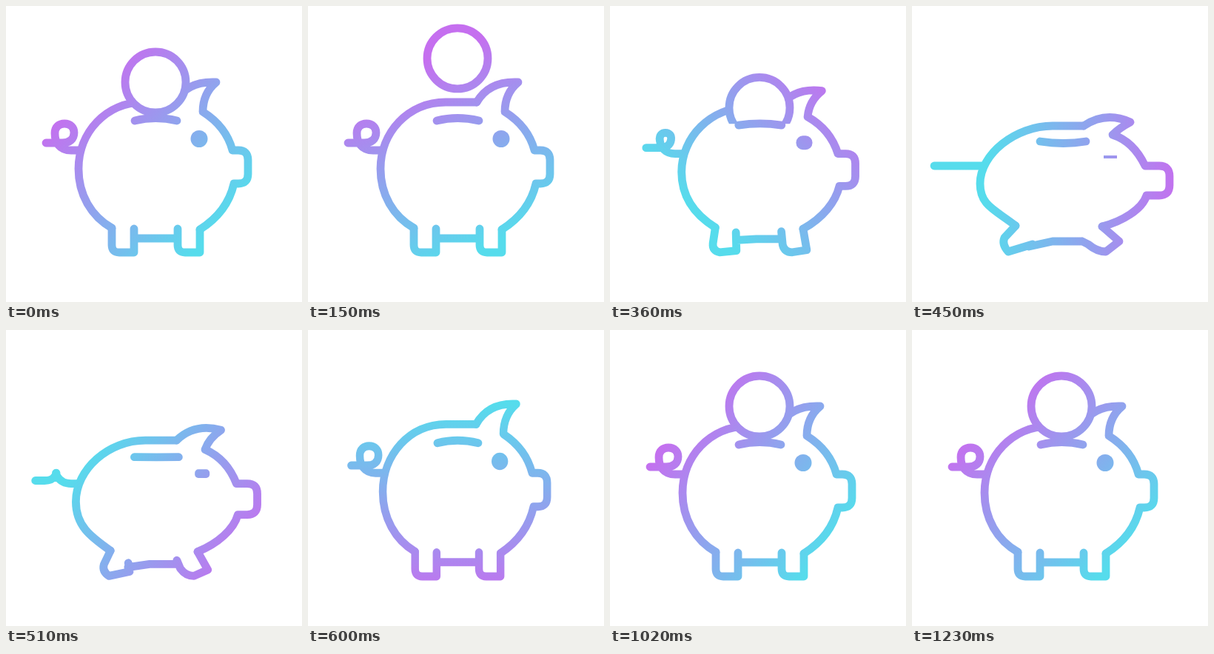
An HTML page with a canvas for the animation above (3260 ms loop, 400x400 px).

```html
<!DOCTYPE html>
<html lang="en">
<head>
<meta charset="utf-8">
<title>Piggy bank</title>
<style>
  html, body { margin: 0; width: 100%; height: 100%; overflow: hidden; background: #fff; }
  canvas { display: block; width: 100vw; height: 100vh; }
</style>
</head>
<body>
<canvas id="stage" width="400" height="400"></canvas>
<script>
const ctx = document.getElementById('stage').getContext('2d');
const LOOP = 3260, END = 1230, STEP = 30;
const CYAN = '#56dcec', PURPLE = '#c56fef';

// Each part has a resting pose and a squashed pose with the same commands.
const parts = [
  { // back and belly
    rest: 'M228 130 L186 130 C135 130 98 171 98 220 C98 255 115 284 143 300',
    flat: 'M232 162 L190 162 C140 162 92 200 92 240 C92 270 112 275 140 297'
  },
  { // legs
    rest: 'M143 300 L143 323 Q143 333 153 333 L173 333 L173 301 M175 314 L200 314 L231 314 ' +
          'M232 301 L232 323 Q232 333 242 333 L262 333 L262 302',
    flat: 'M140 297 L125 313 Q121 322 130 332 L163 322 L160 324 M158 325 L190 318 L230 318 ' +
          'M230 318 L238 322 Q250 332 262 332 L280 318 L257 298'
  },
  { // chest, snout, brow and ear
    rest: 'M262 302 C289 285 303 262 308 240 L314 240 Q327 240 327 227 L327 208 ' +
          'Q327 195 314 195 L306 195 C300 172 285 155 266 143 Q266 118 284 103 Q245 101 228 130',
    flat: 'M257 298 C284 291 311 275 317 256 L334 256 Q348 256 348 242 L348 230 ' +
          'Q348 216 334 216 L315 216 C305 195 290 180 271 174 Q280 165 295 157 Q262 142 232 162'
  },
  { // tail
    rest: 'M101 195 L88 195 C72 195 66 184 66 172 C66 163 72 159 79 159 ' +
          'C87 159 92 164 92 171 C92 180 86 185 76 185 L54 185',
    flat: 'M95 216 L88 216 C82 216 77 216 72 216 C68 216 64 216 60 216 ' +
          'C56 216 52 216 48 216 C44 216 40 216 36 216 L30 216'
  },
  { // slot
    rest: 'M174 155 Q202 148 231 155',
    flat: 'M173 183 Q205 188 235 183'
  }
];

const mix = (a, b, k) => a + (b - a) * k;
const out = p => 1 - (1 - p) ** 2;
const swing = p => 0.5 - 0.5 * Math.cos(Math.PI * p);

function morph({ rest, flat }, k) {
  const goal = flat.match(/\d+/g);
  let i = 0;
  return new Path2D(rest.replace(/\d+/g, n => mix(+n, +goal[i++], k).toFixed(2)));
}

// Eases to a stop at every key.
function keyed(keys, t) {
  for (let i = 1; i < keys.length; i++) {
    const [t0, a] = keys[i - 1], [t1, b] = keys[i];
    if (t < t1) return mix(a, b, swing(Math.max(0, (t - t0) / (t1 - t0))));
  }
  return keys[keys.length - 1][1];
}

// Runs smoothly through every key.
function flowing(keys, t) {
  const last = keys.length - 1;
  const slope = i => i === 0 || i === last ? 0 :
    (keys[i + 1][1] - keys[i - 1][1]) / (keys[i + 1][0] - keys[i - 1][0]);
  let i = 0;
  while (i < last - 1 && t >= keys[i + 1][0]) i++;
  const [t0, a] = keys[i], [t1, b] = keys[i + 1];
  const d = t1 - t0, p = Math.min(1, (t - t0) / d), q = 1 - p;
  return a * q * q * (1 + 2 * p) + b * p * p * (3 - 2 * p) +
    d * p * q * (slope(i) * q - slope(i + 1) * p);
}

// Above 0 the pig is squashed, below 0 it is stretched upwards.
const squash = t => keyed([[320, 0], [450, 1], [595, -0.1], [700, 0]], t);
const turn = t => flowing([[0, 314], [300, 381], [450, 452], [600, 540],
  [780, 616], [1020, 668], [1230, 674]], t);

function coinY(t) {
  if (t < 210) return 103 - 35 * out(t / 210);
  if (t < 450) return 68 + 25 * ((t - 210) / 90) ** 2;
  if (t < 790) return null;
  if (t < 900) return mix(200, 86, out((t - 790) / 110));
  if (t < 1020) return 86 + 17 * ((t - 900) / 120) ** 2;
  const p = Math.min(1, (t - 1020) / 180);
  return 103 - 28 * p * (1 - p);
}

function paint(t) {
  const a = turn(t) * Math.PI / 180;
  const at = r => [212 + r * Math.sin(a), 215 - r * Math.cos(a)];
  const ink = ctx.createLinearGradient(...at(-112), ...at(150));
  ink.addColorStop(0, CYAN);
  ink.addColorStop(1, PURPLE);
  return ink;
}

function drawCoin(y, slotY) {
  ctx.save();
  ctx.beginPath();
  ctx.rect(0, 0, 400, slotY);
  ctx.clip();
  ctx.beginPath();
  ctx.arc(202, y, 41, 0, 2 * Math.PI);
  ctx.fillStyle = '#fff';
  ctx.fill();
  ctx.stroke();
  ctx.restore();
}

function drawEye(k) {
  const rx = mix(11.5, 9, k), ry = mix(11.5, 2, k);
  ctx.beginPath();
  ctx.roundRect(mix(261, 268, k) - rx, mix(179.5, 204, k) - ry, 2 * rx, 2 * ry,
    Math.min(rx, ry, 11.5 * (1 - k)));
  ctx.fill();
}

function draw(t) {
  const s = squash(t), k = Math.max(0, s), stretch = Math.max(0, -s);
  const y = coinY(t), ink = paint(t);
  ctx.fillStyle = '#fff';
  ctx.fillRect(0, 0, 400, 400);
  ctx.strokeStyle = ctx.fillStyle = ink;
  ctx.lineWidth = 10.8;
  ctx.lineCap = ctx.lineJoin = 'round';
  ctx.save();
  ctx.translate(200, 333);
  ctx.scale(1 - 0.3 * stretch, 1 + 0.13 * stretch);
  ctx.translate(-200, -333);
  const [slot, ...body] = [...parts].reverse();
  body.forEach(part => ctx.stroke(morph(part, k)));
  drawEye(k);
  if (y !== null) drawCoin(y, mix(152, 185, k));
  ctx.stroke(morph(slot, k));
  ctx.restore();
}

function frame() {
  const t = performance.now() % LOOP;
  draw(Math.min(END, Math.floor(t / STEP) * STEP));
  requestAnimationFrame(frame);
}
frame();
</script>
</body>
</html>
```
